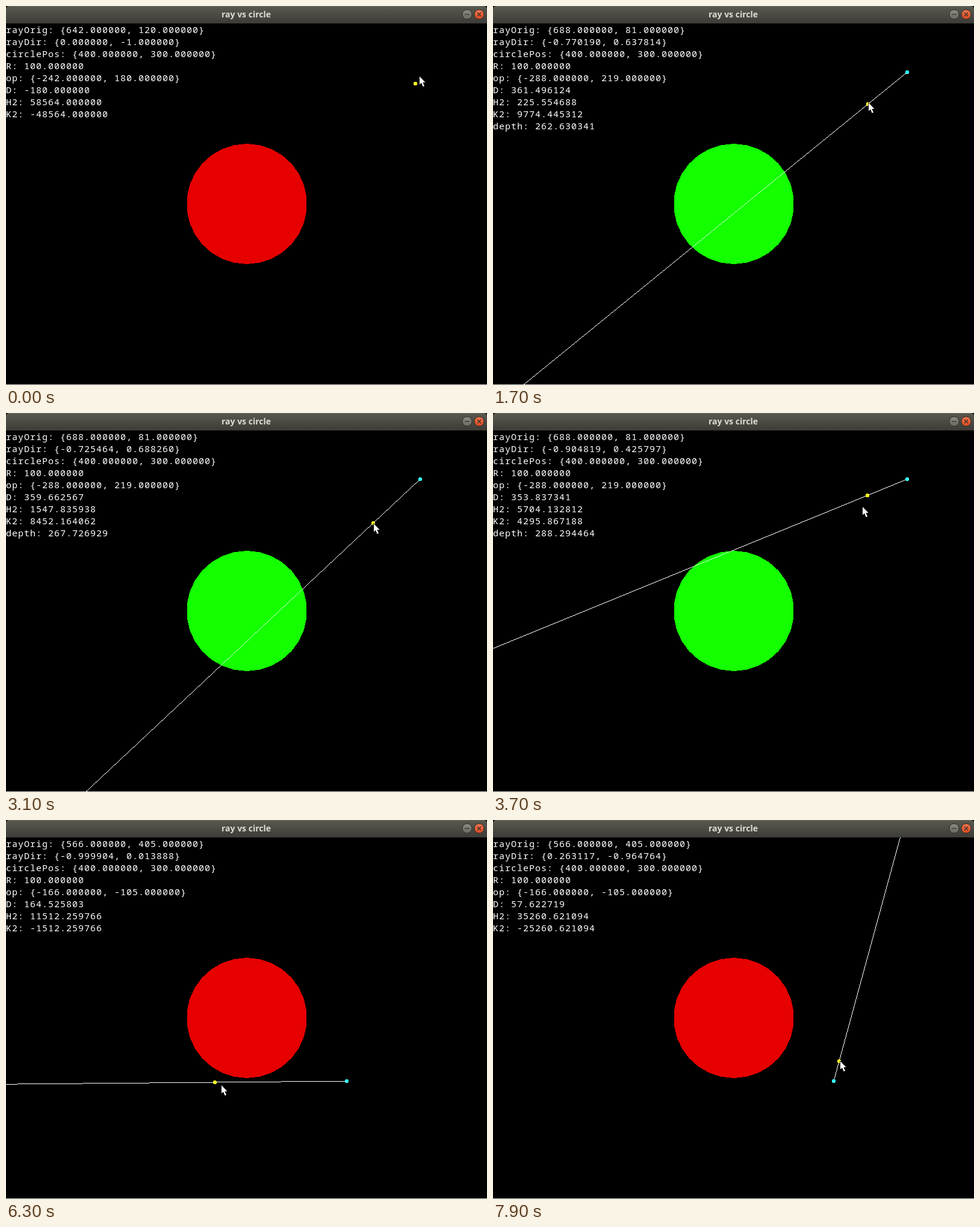
Write an HTML page with a canvas that moves like this. It is 799x630 px and loops after 8 s.

```html
<!DOCTYPE html>
<html lang="en">
<head>
<meta charset="utf-8">
<title>ray vs circle</title>
<style>
  html, body { margin: 0; width: 100%; height: 100%; overflow: hidden; background: #000; }
  canvas { position: absolute; left: 0; top: 0; }
  h1 {
    position: absolute; left: 0; top: 0; width: 798px; margin: 0;
    font: bold 14px/28px "Open Sans", "Noto Sans", sans-serif;
    text-align: center; color: #dfdbd2;
  }
  pre {
    position: absolute; left: 0; top: 29px; margin: 0;
    font: 15px/20px "Noto Sans Mono", monospace;
    letter-spacing: 1px; color: #fff;
  }
</style>
</head>
<body>
<canvas id="stage" width="799" height="630"></canvas>
<h1>ray vs circle</h1>
<pre id="readout"></pre>
<script>
const W = 799, TOP = 29, BOTTOM = 629, LOOP = 8000, STEP = 100;
const TEXT_LAG = 16, CURSOR_LAG = 60;
const CENTER = [400, 300], R = 100;
const ctx = document.getElementById('stage').getContext('2d');
const readout = document.getElementById('readout');
const f32 = Math.fround;

// Turning points of the pointer: time, x, y in stage pixels
const PATH = [
  [380, 680, 129], [400, 688, 110], [740, 640, 144], [1040, 640, 144], [1084, 638, 145],
  [1900, 622, 172], [2284, 650, 205], [2550, 662, 212], [3000, 612, 185], [3550, 605, 178],
  [3684, 620, 142], [3950, 652, 62], [4350, 742, 85], [4600, 713, 186], [4740, 674, 183],
  [4900, 674, 183], [5140, 654, 309], [5300, 654, 309], [5580, 566, 434], [5850, 480, 500],
  [6100, 388, 453], [6284, 350, 437], [6420, 328, 425], [6800, 400, 310], [7450, 650, 385],
  [7700, 600, 396], [7880, 575, 401]
];

// Ray origin in client pixels; a held button aims at the pointer
const PHASES = [
  { at: 0, orig: [642, 120], aim: [0, -1] },
  { at: 390, orig: [688, 81] },
  { at: 4950, orig: [688, 81], aim: [-14, 73] },
  { at: 5150, orig: [654, 280], aim: [0, -1] },
  { at: 5580, orig: [566, 405] }
];

const slope = (i, n) => {
  const a = PATH[i], b = PATH[i + 1];
  return a && b ? (b[n] - a[n]) / (b[0] - a[0]) : 0;
};

// Monotone tangent: flat at rests and reversals
const tangent = (i, n) => {
  const a = slope(i - 1, n), b = slope(i, n);
  return a * b > 0 ? 2 * a * b / (a + b) : 0;
};

function pointer(t) {
  const last = PATH[PATH.length - 1];
  const time = Math.min(Math.max(t, PATH[0][0]), last[0]);
  const i = Math.max(0, PATH.findIndex(k => k[0] >= time) - 1);
  const a = PATH[i], b = PATH[i + 1], h = b[0] - a[0], u = (time - a[0]) / h, v = 1 - u;
  return [1, 2].map(n => Math.round(
    a[n] * v * v * (1 + 2 * u) + b[n] * u * u * (1 + 2 * v) +
    h * u * v * (tangent(i, n) * v - tangent(i + 1, n) * u)));
}

function cursorAt(t) {
  return t < 500 ? [687, t < 200 ? 117 : 109] : pointer(t - CURSOR_LAG);
}

function rayAt(t) {
  const { orig, aim } = PHASES.filter(p => p.at <= t).pop();
  const [mx, my] = pointer(t);
  let [x, y] = aim || [mx - orig[0], my - TOP - orig[1]];
  const pressed = !aim, visible = pressed && (x !== 0 || y !== 0);
  if (!x && !y) y = -1;
  const len = f32(Math.hypot(x, y));
  return { orig, dir: [f32(x / len), f32(y / len)], pressed, visible };
}

function solve({ orig, dir }) {
  const op = [CENTER[0] - orig[0], CENTER[1] - orig[1]];
  const dot = (a, b) => f32(a[0] * b[0] + a[1] * b[1]);
  const D = dot(op, dir);
  const H2 = f32(dot(op, op) - f32(D * D));
  const K2 = f32(R * R - H2);
  return { op, D, H2, K2, hit: D >= 0 && K2 >= 0 };
}

// Six decimals, ties to even
function fixed(v) {
  const s = Math.abs(v) * 1e6;
  let n = Math.floor(s);
  if (s - n > .5 || (s - n === .5 && n % 2)) n++;
  return (v < 0 ? '-' : '') + (n / 1e6).toFixed(6);
}

const pair = p => `{${fixed(p[0])}, ${fixed(p[1])}}`;

function describe(ray) {
  const s = solve(ray);
  const lines = [
    'rayOrig: ' + pair(ray.orig),
    'rayDir: ' + pair(ray.dir),
    'circlePos: ' + pair(CENTER),
    'R: ' + fixed(R),
    'op: ' + pair(s.op),
    'D: ' + fixed(s.D),
    'H2: ' + fixed(s.H2),
    'K2: ' + fixed(s.K2)
  ];
  if (s.hit) lines.push('depth: ' + fixed(f32(s.D - Math.sqrt(s.K2))));
  return lines.join('\n');
}

// 30-sided disc with hard pixel edges, filled row by row
function disc(x, y, r, fill) {
  const side = Math.PI / 15, apothem = r * Math.cos(side / 2);
  ctx.fillStyle = fill;
  for (let row = Math.floor(y - r); row < y + r; row++) {
    const dy = row + .5 - y;
    let half = r;
    for (let i = -7; i <= 7; i++) {
      half = Math.min(half, (apothem - dy * Math.sin(i * side)) / Math.cos(i * side));
    }
    const left = Math.ceil(x - half - .5), right = Math.ceil(x + half - .5);
    if (right > left) ctx.fillRect(left, row, right - left, 1);
  }
}

// One hard pixel per step along the longer axis, sampled at pixel centres
function drawRay({ orig, dir }) {
  const m = Math.max(Math.abs(dir[0]), Math.abs(dir[1]));
  const sx = dir[0] / m, sy = dir[1] / m;
  let x = orig[0] + sx / 2, y = orig[1] + TOP + sy / 2;
  ctx.fillStyle = '#fff';
  while (x >= 0 && x < W && y >= TOP && y < BOTTOM) {
    ctx.fillRect(Math.floor(x), Math.floor(y), 1, 1);
    x += sx;
    y += sy;
  }
}

function drawCursor([x, y]) {
  const shape = [[0, 0], [0, 13.5], [3, 10.8], [5.6, 17], [8, 16], [5.4, 10], [9.5, 10]];
  ctx.beginPath();
  shape.forEach(p => ctx.lineTo(x + p[0], y + p[1]));
  ctx.closePath();
  ctx.strokeStyle = '#000';
  ctx.lineWidth = 1.6;
  ctx.lineJoin = 'round';
  ctx.stroke();
  ctx.fillStyle = '#fff';
  ctx.fill();
}

function drawButton(x, from, to, mark) {
  const g = ctx.createLinearGradient(0, 6, 0, 22);
  g.addColorStop(0, from);
  g.addColorStop(1, to);
  ctx.beginPath();
  ctx.arc(x, 14, 8, 0, 7);
  ctx.fillStyle = g;
  ctx.fill();
  ctx.strokeStyle = '#2f2d29';
  ctx.lineWidth = 1;
  ctx.stroke();
  ctx.beginPath();
  mark.forEach(([x1, y1, x2, y2]) => {
    ctx.moveTo(x + x1, 14 + y1);
    ctx.lineTo(x + x2, 14 + y2);
  });
  ctx.strokeStyle = '#33302b';
  ctx.lineWidth = 1.2;
  ctx.stroke();
}

function drawWindow() {
  ctx.fillStyle = '#000';
  ctx.fillRect(0, 0, W, 630);
  const g = ctx.createLinearGradient(0, 0, 0, TOP);
  g.addColorStop(0, '#5a5950');
  g.addColorStop(1, '#3c3b37');
  ctx.fillStyle = g;
  ctx.beginPath();
  ctx.roundRect(0, 0, W, TOP, [5, 5, 0, 0]);
  ctx.fill();
  ctx.fillStyle = '#6a695f';
  ctx.fillRect(5, 0, W - 10, 1);
  drawButton(766, '#8d8b82', '#6a6860', [[-4, 0, 4, 0]]);
  drawButton(786, '#f0764f', '#d9481e', [[-3, -3, 3, 3], [-3, 3, 3, -3]]);
  ctx.fillStyle = '#d4d4d2';
  ctx.fillRect(0, BOTTOM, W, 1);
}

function draw(t) {
  const ray = rayAt(t), [mx, my] = pointer(t);
  const fill = solve(ray).hit ? '#14ff00' : '#e60000';
  const circle = () => disc(CENTER[0], CENTER[1] + TOP, R, fill);
  drawWindow();
  circle();
  if (ray.visible) {
    drawRay(ray);
    ctx.globalAlpha = .2;
    circle();
    ctx.globalAlpha = 1;
  }
  if (ray.pressed) disc(ray.orig[0], ray.orig[1] + TOP, 3, '#33ffff');
  disc(mx, my, 3, '#ffff20');
  drawCursor(cursorAt(t));
  readout.textContent = describe(rayAt(Math.max(0, t - TEXT_LAG)));
}

const start = performance.now();
let shown = -1;
function tick() {
  const t = Math.floor(((performance.now() - start) % LOOP) / STEP) * STEP;
  if (t !== shown) draw(shown = t);
  requestAnimationFrame(tick);
}
tick();
</script>
</body>
</html>
```
